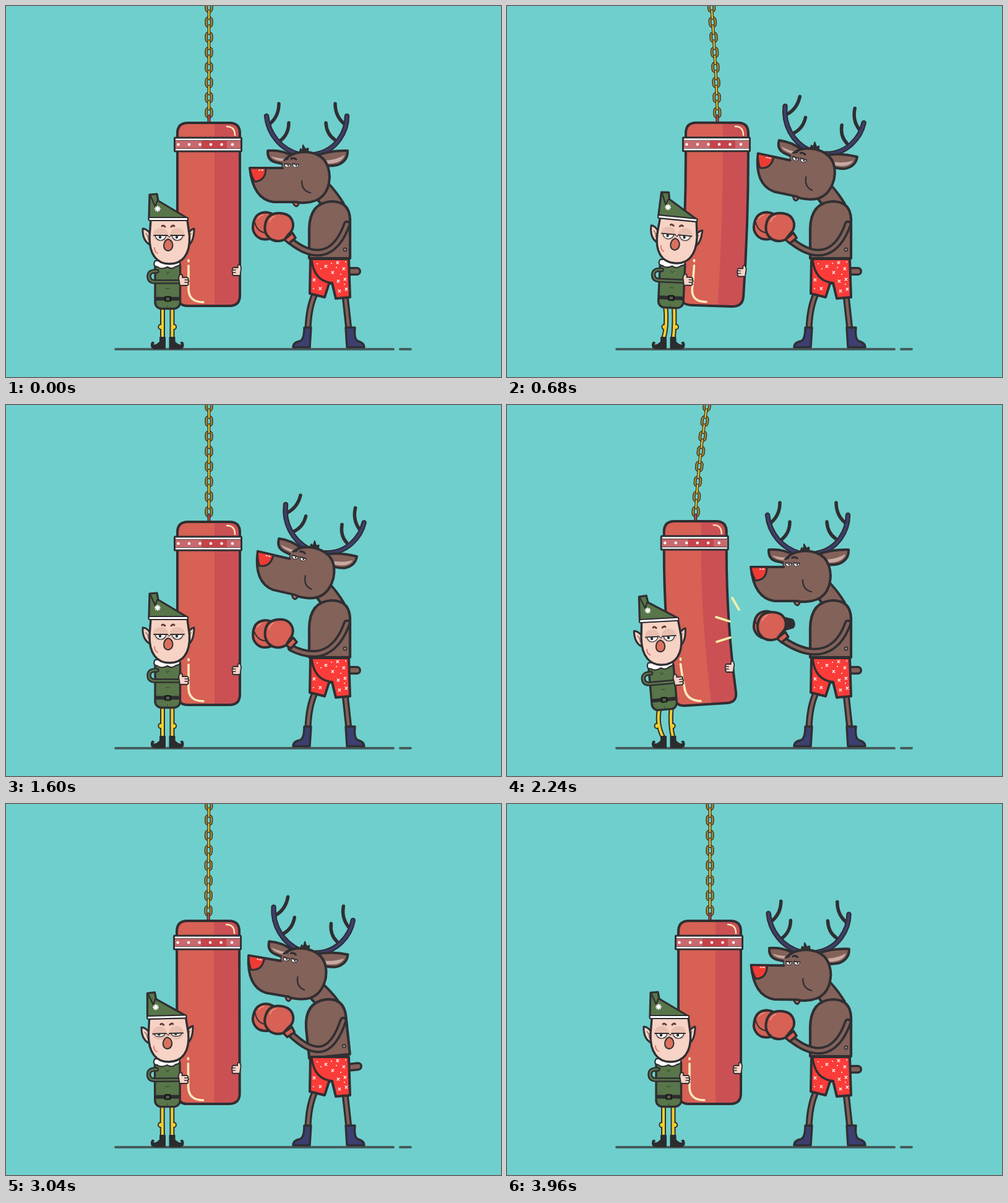
Write an HTML page with a canvas that moves like this. It is 800 by 600 pixels and loops after 4 s.

```html
<!DOCTYPE html>
<html lang="en">
<head>
<meta charset="utf-8">
<title>Boxing practice</title>
<style>
html, body { margin: 0; width: 100%; height: 100%; overflow: hidden; background: #6fcfcd; }
canvas { display: block; }
</style>
</head>
<body>
<canvas id="stage" width="800" height="600"></canvas>
<script>
const ctx = document.getElementById('stage').getContext('2d');
const DARK = '#302f32', RED = '#d66154', DEEP = '#cb5054', CREAM = '#fbe9bd', BROWN = '#83625a',
  NAVY = '#3d3f70', GREEN = '#58764a', SKIN = '#f6d3c5', YELLOW = '#f0cf2c', SHORTS = '#fb3c39';
ctx.lineCap = ctx.lineJoin = 'round';

function shape(d, fill, stroke, width = 4) {
  const path = new Path2D(d);
  if (fill) { ctx.fillStyle = fill; ctx.fill(path); }
  if (stroke) { ctx.strokeStyle = stroke; ctx.lineWidth = width; ctx.stroke(path); }
}
function tube(d, color, outer, inner) {
  shape(d, null, DARK, outer);
  shape(d, null, color, inner);
}
function oval(x, y, rx, ry, fill, stroke, width = 3) {
  ctx.beginPath();
  ctx.ellipse(x, y, rx, ry, 0, 0, 7);
  if (fill) { ctx.fillStyle = fill; ctx.fill(); }
  if (stroke) { ctx.strokeStyle = stroke; ctx.lineWidth = width; ctx.stroke(); }
}
function box(x, y, w, h, r, fill, stroke, width = 4) {
  ctx.beginPath();
  ctx.roundRect(x, y, w, h, r);
  if (fill) { ctx.fillStyle = fill; ctx.fill(); }
  if (stroke) { ctx.strokeStyle = stroke; ctx.lineWidth = width; ctx.stroke(); }
}
function posed(px, py, deg, dx, dy, draw) {
  ctx.save();
  ctx.translate(px + dx, py + dy);
  ctx.rotate(deg * Math.PI / 180);
  ctx.translate(-px, -py);
  draw();
  ctx.restore();
}
// Keys are [time, value] pairs joined by cosine easing.
function ease(t, keys) {
  if (t <= keys[0][0]) return keys[0][1];
  for (let i = 1; i < keys.length; i++) {
    const [a, from] = keys[i - 1], [b, to] = keys[i];
    if (t <= b) return from + (to - from) * (1 - Math.cos(Math.PI * (t - a) / (b - a))) / 2;
  }
  return keys[keys.length - 1][1];
}

// Push of the bag to the left, in pixels.
const HIT = 165, PEAK = 440, FAR = 56;
function pushAt(t) {
  if (t < HIT) return 0;
  if (t < PEAK) return FAR * Math.sin(Math.PI / 2 * (t - HIT) / (PEAK - HIT));
  return ease(t, [[PEAK, FAR], [720, -15.5], [900, 8], [1080, 0]]);
}

// The chain hangs in a curve that turns upright at the bag.
function link(y, push, draw) {
  const u = (187 - y) / 217;
  const slope = push * 1.5 * Math.sqrt(u) / 217;
  posed(328, y, Math.atan(slope) * 180 / Math.PI, -push * (1 - u ** 1.5), 0, () => draw(y));
}
function chain(push) {
  for (let k = 0; k < 8; k++) link(172.5 - k * 24.4, push, y => {
    box(323.8, y - 7, 8.4, 14, 4.2, null, '#45412c', 5);
    box(323.8, y - 7, 8.4, 14, 4.2, null, '#bd9a36', 1.7);
  });
  for (let k = 0; k < 8; k++) link(160.3 - k * 24.4, push, y => {
    shape(`M328,${y - 6}V${y + 6}`, null, '#45412c', 5);
    shape(`M328,${y - 6}V${y + 6}`, null, '#e6c433', 2.2);
  });
  link(183, push, () => tube('M328,178V189', '#c8443f', 5, 2.4));
}

function hand(x, y, flip) {
  ctx.save();
  ctx.translate(x, y);
  ctx.scale(flip, 1);
  shape('M-9,-4Q-8,-10 -5,-10Q-2,-9 -3,-5H5Q8,-3 6,-1Q9,1 6,3Q8,6 5,8H-7Z', SKIN, DARK, 2);
  shape('M1,-1H6M1,3H6', null, DARK, 1.4);
  ctx.restore();
}

// The bag bends below its strap: the bottom lags by `bend`.
function bag(push) {
  const bend = push * 0.75, low = bend * 0.87, tip = bend * 0.18;
  const outline = `M277,236V206Q277,189 294,189H361Q378,189 378,206V236
    Q378,352 ${378 + low},${468 - tip}Q${378 + bend},${485 - tip} ${361 + bend},${485 - tip * 0.7}
    L${294 + bend},${485 + tip * 0.7}Q${277 + bend},${485 + tip} ${277 + low},${468 + tip}Q277,352 277,236Z`;
  shape(outline, RED);
  ctx.save();
  ctx.clip(new Path2D(outline));
  shape(`M337,189V236Q337,352 ${337 + bend},490H440V189Z`, DEEP);
  ctx.restore();
  shape(outline, null, DARK, 4);
  shape('M357,195Q370,195 370,209', null, CREAM, 2.4);
  const mid = bend * 0.5;
  shape(`M${295 + mid},411V413M${295 + mid},420Q${295 + bend * 0.65},440 ${295 + low},459Q${296 + bend},479 ${319 + bend},${479 + tip * 0.2}`, null, CREAM, 3.6);
  box(272.5, 213, 108, 22, 1, '#fff', DARK, 3);
  ctx.fillStyle = '#c9696e';
  ctx.fillRect(274, 218, 105, 12);
  ctx.fillStyle = '#c6434a';
  ctx.fillRect(316, 218, 41, 12);
  shape('M274,217.5H379M274,230.5H379', null, '#5c4549', 1.2);
  for (let i = 0; i < 6; i++) oval(278.5 + i * 17.5, 224, 2.3, 2.3, '#fff');
  hand(372 + bend * 0.6, 428 - tip, -0.9);
}

function elfLegs(dx, dy) {
  for (const [x, side, sway] of [[253, -1, dx], [268.5, 1, dx * 0.45]]) {
    const hip = x + sway, bend = x + 2.1 * sway;
    const kx = (hip + 2 * bend + x) / 4 + side * 3;
    oval(kx, 519, 4.6, 5, DARK);
    tube(`M${hip},${486 + dy}Q${bend},515 ${x},539`, YELLOW, 8, 4);
    oval(kx, 519, 2.7, 3.1, YELLOW);
    ctx.save();
    ctx.translate(x, 0);
    ctx.scale(side, 1);
    shape('M-4,536H4V543Q10,550 15,548Q17,545 14,545Q17,542 18,547Q19,554 12,554H-4Z', '#2c2c2f', '#2c2c2f', 2);
    ctx.restore();
  }
}

function elfHead(blink) {
  shape('M233,368Q227,360 221,360Q220,380 234,387Z', SKIN, DARK, 3);
  shape('M295,367Q299,361 304,360Q304,380 295,387Z', SKIN, DARK, 3);
  shape('M226,368Q230,371 230,378M299,368Q296,372 296,378', null, '#9b6e62', 1.6);
  shape('M234,346H293L296.5,372C298,402 285,417 264,417C244,417 231,402 232,372Z', SKIN, DARK, 3.4);
  for (const x of [250, 277]) {
    const low = 379 - blink * 3;
    oval(x, 370, 12, 11, '#e9c0b0');
    shape(`M${x - 9},371H${x + 9}Q${x + 7},${low} ${x},${low}Q${x - 7},${low} ${x - 9},371Z`, '#fff', DARK, 1.2);
    oval(x - 1, 373.8 - blink, 2.2, 2.5 - blink, DARK);
    shape(`M${x - 11},371H${x + 11}`, null, DARK, 1.8);
  }
  shape('M261,371L264,374L266,371', null, '#594a48', 1.3);
  shape('M252,356Q254,354 257,357M267,357Q270,354 272,356', null, '#653c35', 3);
  shape('M262,377Q269,379 269.5,387Q269,395 262,396Q255,395 255,387Q256,379 262,377Z', '#d9705d', DARK, 2);
  shape('M240,391Q240,398 245,400', null, '#e26f63', 1.8);
  shape('M232,305L244,304L246,315L293,343H231Z', GREEN, DARK, 3.2);
  shape('M233,306L241,324L245,314', null, DARK, 2.4);
  box(230.5, 342, 63.5, 5, 2, '#fff', DARK, 2.2);
  for (let i = 0; i < 4; i++) posed(245, 328, i * 45, 0, 0, () => shape('M241,328H249', null, '#fff', 1.9));
}

function elf(push, nod, blink) {
  const dx = -0.26 * push, dy = 0.13 * push;
  elfLegs(dx, dy);
  posed(261, 490, -0.22 * push, dx, dy, () => {
    box(241, 415, 40.5, 74.5, [4, 4, 10, 10], GREEN, DARK, 3.4);
    shape('M259,430L261,433L264,430M258,457H264M261,485V488', null, '#3e5635', 1.5);
    box(241, 470.5, 40, 6, 0, '#2c2c2f');
    box(257, 470, 9, 7.5, 1, null, '#111', 1.6);
    box(259, 472, 5, 3.5, 0, '#5a614e');
    tube('M244,429Q231,428 231,437Q231,446 241,446H279', GREEN, 7.5, 2.6);
    hand(288, 444, 1);
    shape('M241,412Q236,421 245,422Q251,427 261,422Q268,427 275,421Q284,420 280,412Z', '#fff', DARK, 2.2);
    posed(261, 415, nod, 0, 0, () => elfHead(blink));
  });
}

function sparks(t) {
  const u = (t - HIT) / 150;
  if (u <= 0 || u >= 1) return;
  const grow = Math.sin(Math.PI * u) / 2;
  for (const [x, y, vx, vy] of [[369.5, 321.5, -11, -19], [349, 346.5, -22, -7], [350, 379.5, -22, 7]]) {
    const move = (u * 2 - 1) * 0.45, cx = x + vx * move, cy = y + vy * move;
    shape(`M${cx - vx * grow},${cy - vy * grow}L${cx + vx * grow},${cy + vy * grow}`, null, '#f8f0a9', 3.6);
  }
}

function reindeerLegs() {
  tube('M500,464Q489,487 488,523', BROWN, 11, 4.5);
  tube('M548,468L554,523', BROWN, 11, 4.5);
  shape('M482,520H493L491,552H464Q464,544 475,542Q482,539 482,520Z', NAVY, DARK, 3.4);
  shape('M549,520H564Q562,539 569,542Q579,545 579,552H551Z', NAVY, DARK, 3.4);
}

function shorts() {
  shape('M492,409H554L556,471L533,473L527,448L522,449L515,471L491,465Z', SHORTS, DARK, 4);
  shape('M494,411Q498,445 527,448', null, DARK, 3.4);
  const marks = [[517, 421], [536, 415], [546, 425], [528, 431], [498, 443], [508, 457], [537, 445], [548, 442], [539, 461], [550, 458]];
  for (const [x, y] of marks) shape(`M${x - 1.7},${y - 1.7}l3.4,3.4m0,-3.4l-3.4,3.4`, null, '#fff', 1.4);
  for (const [x, y] of [[503, 417], [509, 425], [526, 416], [541, 434], [549, 414], [534, 423], [497, 457], [547, 450]])
    oval(x, y, 1, 1, '#fff');
}

function reindeerHead() {
  for (const d of ['M441,158C441,172 435,183 427,190', 'M457,189Q457,208 442,219',
    'M532,158C532,172 538,183 546,190', 'M517,189Q518,207 531,216']) shape(d, null, DARK, 5.5);
  tube('M421,178C424,207 444,232 474,240', NAVY, 8.5, 4);
  tube('M551,178C551,202 535,234 500,240', NAVY, 8.5, 4);
  shape('M423,234Q422,250 437,253L455,257L462,242Q445,232 423,234Z', BROWN, DARK, 4);
  shape('M428,243Q434,250 450,251L452,247Q437,246 428,243Z', '#c8aaa3');
  shape('M552,234Q553,250 536,257Q522,260 512,257L504,241Q526,233 552,234Z', BROWN, DARK, 4);
  shape('M547,241Q536,248 517,250L518,255Q543,255 547,241Z', '#c8aaa3');
  shape('M463,315Q465,324 470,324Q475,320 473,315Z', '#b86d69', DARK, 2.8);
  shape('M474,238L476,231L479,234L480,225L484,232L488,230L489,238Z', DARK, DARK, 2);
  shape('M394,262H447Q449,237 484,236Q522,238 523,277Q521,316 484,318Q475,319 469,317H432Q399,312 394,262Z', BROWN, DARK, 4);
  shape('M394,262H420Q420,283 402,284Q396,275 394,262Z', '#ef3b34', DARK, 3);
  shape('M409,265.5H410M413,265.5H415', null, '#ffd9d5', 2);
  shape('M447,249Q451,246 457,252V261H447Z', BROWN);
  for (const x of [455, 468]) {
    shape(`M${x - 5},256H${x + 5}Q${x + 4},261 ${x},261Q${x - 4},261 ${x - 5},256Z`, '#fff', DARK, 1.1);
    oval(x + 1, 258, 1.4, 1.5, DARK);
    shape(`M${x - 5},255L${x + 5},256`, null, DARK, 1.6);
  }
  shape('M461,247Q465,245 469,248M450,249L455,247', null, DARK, 3.2);
  shape('M478,283Q478,299 492,302', null, DARK, 2.3);
}

function torso(nod) {
  tube('M556,429H567', BROWN, 14, 7);
  shape('M500,308L522,288Q536,303 546,320L513,326Z', BROWN, DARK, 4);
  shape('M490,408V360Q491,318 526,316Q555,316 556,345V408Z', BROWN, DARK, 4.2);
  oval(548, 394, 2.6, 2.6, '#a98c84', DARK, 1.6);
  posed(505, 320, nod, -nod * 0.24, -nod * 0.14, reindeerHead);
}

function backGlove() {
  shape('M450,344L462,347Q467,354 463,360L450,364Z', DARK, DARK, 2);
  shape('M399,356Q401,334 420,333.5Q437,335 441,352Q442,372 424,377Q411,379 404,371Q398,364 399,356Z', RED, DARK, 4);
  shape('M402,350Q406,366 421,367', null, DARK, 2);
  shape('M407,343Q410,339 415,338', null, '#eb8b77', 2);
}
function frontGlove() {
  shape('M450,378L463,367L468,375L457,384Z', RED, DARK, 3.6);
  shape('M418.5,356Q421,335 441,335Q461,335 464,352Q465,362 457,369L450,378Q438,383 428,377Q417,369 418.5,356Z', RED, DARK, 4);
  shape('M426,349Q428,342 434,340', null, '#eb8b77', 2);
}

function reindeer(t) {
  const lean = ease(t, [[760, 0], [1040, 6], [1330, 0]]);
  const tilt = ease(t, [[380, 0], [680, 12], [820, 14], [1040, 15.5], [1320, 13.6], [1600, 13], [1720, 14], [2000, 0]]);
  const lift = ease(t, [[700, 0], [1040, -8.5], [1600, 12], [1970, 0]]);
  const reach = ease(t, [[40, 0], [160, -56], [245, -13], [330, 0]]);
  reindeerLegs();
  posed(523, 408, -lean, 0, 0, () => torso(tilt));
  shorts();
  posed(440, 357, -0.6 * lift, 0, lift, backGlove);
  tube(`M${551 - lean},${353 - lean * 0.45}C${535 - lean},398 ${505 + reach * 0.4},415 ${461 + reach},${381 + lift}`, BROWN, 12.5, 5);
  posed(440, 357, -0.6 * lift, reach, lift, frontGlove);
}

function frame(now) {
  const t = Math.floor(now / 40) * 40 % 2000;
  const push = pushAt(t);
  const nod = ease(t, [[HIT, 0], [240, 2], [440, -3], [680, 3], [860, 1], [1040, -1.4], [1240, 0]]);
  const blink = ease(t, [[920, 0], [1000, 1], [1080, 1], [1160, 0]]);
  ctx.fillStyle = '#6fcfcd';
  ctx.fillRect(0, 0, 800, 600);
  shape('M177,555H626M637,555H654', null, '#465d5f', 4);
  chain(push);
  posed(328, 187, 0, -push, -push * push / 600, () => bag(push));
  elf(push, nod, blink);
  sparks(t);
  reindeer(t);
}

const start = performance.now();
function loop() {
  frame(performance.now() - start);
  requestAnimationFrame(loop);
}
loop();
</script>
</body>
</html>
```
